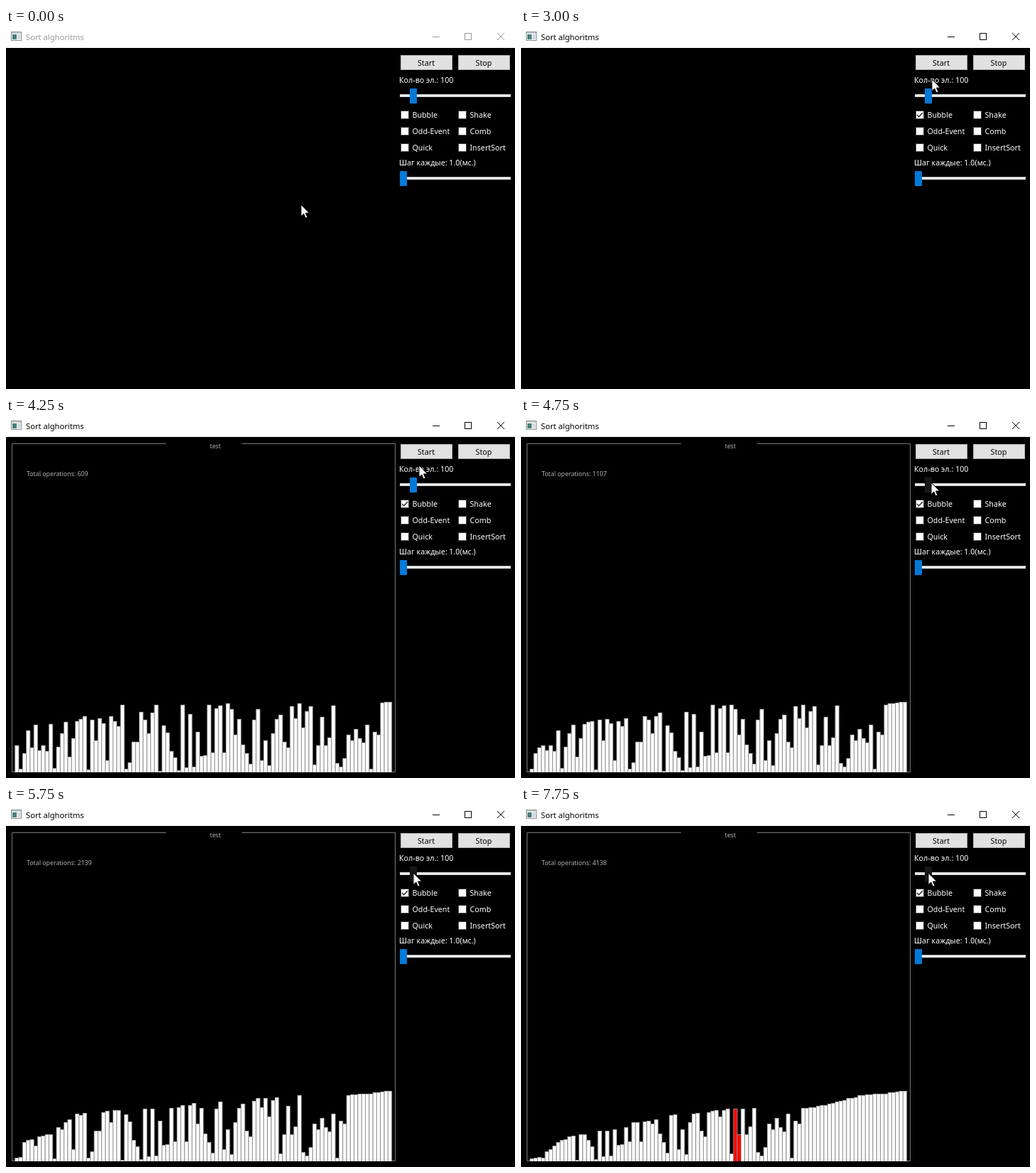
Animation of 716x507 px, one loop 8 s. Source, as an HTML page with a canvas:

```html
<!DOCTYPE html>
<html lang="en">
<head>
<meta charset="utf-8">
<title>Sorting</title>
<style>
  html, body { margin: 0; width: 100%; height: 100%; overflow: hidden; background: #000; }
  canvas { display: block; }
</style>
</head>
<body>
<canvas id="stage" width="716" height="507"></canvas>
<script>
const ctx = document.getElementById('stage').getContext('2d');
const LOOP = 8000, TICK = 250, SORT_START = 3750;

// Bar heights when the chart appears, with the first pass at FIRST_INDEX.
const FIRST_INDEX = 57;
const HEIGHTS = [
  72, 67, 75, 38, 5, 27, 59, 35, 68, 31, 38, 30, 79, 6, 36, 55, 71, 22, 48, 97,
  95, 79, 4, 74, 45, 76, 69, 17, 72, 65, 98, 5, 14, 43, 43, 85, 74, 55, 84, 95,
  2, 66, 56, 30, 21, 3, 95, 7, 82, 8, 57, 23, 24, 95, 28, 90, 94, 99, 28, 97,
  89, 53, 75, 39, 27, 12, 74, 89, 17, 45, 10, 55, 75, 81, 43, 35, 93, 76, 99, 63,
  86, 93, 11, 38, 78, 38, 49, 94, 13, 8, 20, 53, 45, 61, 48, 42, 67, 5, 57, 53
];
// Progress at one-second intervals from SORT_START.
const COMPARISONS = [FIRST_INDEX, 580, 1186, 1787, 2448];
const OPERATIONS = [111, 1107, 2139, 3122, 4138];

// Pointer stops: [time, x, y]
const POINTER = [
  [0, 415, 248], [250, 404, 251], [500, 508, 150], [750, 600, 46], [1750, 586, 127],
  [2000, 574, 138], [2250, 560, 121], [2750, 568, 108], [3000, 578, 72], [3250, 583, 48],
  [4250, 581, 68], [4500, 577, 92], [5000, 573, 94]
];

function rect(x, y, w, h, fill, border) {
  if (fill) { ctx.fillStyle = fill; ctx.fillRect(x, y, w, h); }
  if (border) {
    ctx.strokeStyle = border;
    ctx.lineWidth = 1;
    ctx.strokeRect(x + .5, y + .5, w - 1, h - 1);
  }
}

function line(points, color, width = 1) {
  ctx.beginPath();
  points.forEach(([x, y]) => ctx.lineTo(x, y));
  ctx.strokeStyle = color;
  ctx.lineWidth = width;
  ctx.stroke();
}

function text(str, x, y, color = '#fff', size = 10.7, align = 'left') {
  ctx.font = `${size}px "Noto Sans", "Open Sans", sans-serif`;
  ctx.textAlign = align;
  ctx.fillStyle = color;
  ctx.fillText(str, x, y);
}

function button(label, x, fill = '#e1e1e1', border = '#adadad') {
  rect(x, 38, 73, 21, fill, border);
  text(label, x + 36, 53, '#000', 10.7, 'center');
}

function checkbox(label, x, y, checked) {
  rect(x, y, 12, 12, '#fff', '#444');
  if (checked) line([[x + 2, y + 6], [x + 4.7, y + 8.7], [x + 10, y + 3]], '#222', 1.3);
  text(label, x + 16.5, y + 10);
}

function slider(y, handleX, handleColor = '#007ad9') {
  rect(554, y, 156, 4, '#e7eaea', '#d6d6d6');
  rect(handleX, y - 8, 10, 21, handleColor);
}

function titleBar(active) {
  const ink = active ? '#000' : '#999';
  rect(0, 0, 716, 28, '#fff');
  rect(7, 5, 15, 13, '#f4f4f4', '#8a8f94');
  rect(8, 6, 13, 2, '#c9ced2');
  rect(9, 9, 6, 7, '#47807f');
  rect(16, 9, 4, 7, '#d5d9dc');
  text('Sort alghoritms', 28, 17, ink, 11.2);
  line([[600, 12.5], [610, 12.5]], ink);
  rect(645, 7, 10, 10, null, ink);
  line([[691, 7], [701, 17]], ink);
  line([[701, 7], [691, 17]], ink);
}

function panel(t) {
  if (t >= 3500 && t < 3750) button('Start', 555, '#cce4f7', '#005499');
  else if ((t >= 750 && t < 1750) || (t >= 3250 && t < 4250)) button('Start', 555, '#e5f1fb', '#0078d7');
  else if (t >= 1750 && t < 2000) button('Start', 555, '#e2e7ee', '#78a0c8');
  else button('Start', 555);
  button('Stop', 636);
  text('Кол-во эл.: 100', 553, 77);
  slider(93, 568, t >= 4500 ? '#171717' : undefined);
  [['Bubble', 'Shake'], ['Odd-Event', 'Comb'], ['Quick', 'InsertSort']].forEach(([left, right], row) => {
    const y = 116 + row * 23;
    checkbox(left, 555, y, row === 0 && t >= 2250);
    checkbox(right, 636, y);
  });
  text('Шаг каждые: 1.0(мс.)', 553, 193);
  slider(209, 554);
}

function bubbleSort(comparisons) {
  const bars = [...HEIGHTS];
  let j = FIRST_INDEX, last = bars.length - 1;
  for (let n = FIRST_INDEX; n < comparisons; n++) {
    if (bars[j] > bars[j + 1]) [bars[j], bars[j + 1]] = [bars[j + 1], bars[j]];
    if (++j === last) { j = 0; last--; }
  }
  return { bars, j };
}

function chart(t) {
  const seconds = (t - SORT_START) / 1000;
  const i = Math.min(3, Math.floor(seconds));
  const progress = list => Math.round(list[i] + (list[i + 1] - list[i]) * (seconds - i));
  const operations = progress(OPERATIONS);
  const { bars, j } = bubbleSort(progress(COMPARISONS));
  const swapping = operations % 2 === 0 && bars[j] > bars[j + 1];

  line([[225, 37.5], [8.5, 37.5], [8.5, 498.5], [547.5, 498.5], [547.5, 37.5], [332, 37.5]], '#777');
  text('test', 294.5, 44, '#b0b0b0', 8.8, 'center');
  text('Total operations: ' + operations, 29, 83, '#b0b0b0', 8.8);
  bars.forEach((h, k) => {
    const x = 12.7 + k * 5.3;
    ctx.fillStyle = swapping && (k === j || k === j + 1) ? '#f00' : '#fff';
    ctx.fillRect(x, 499 - h, 5.3, h);
    line([[x, 499], [x, 499.5 - h], [x + 5.3, 499.5 - h], [x + 5.3, 499]], '#8c8c8c', .9);
  });
}

function pointer(t) {
  const [, x, y] = POINTER.findLast(stop => stop[0] <= t);
  ctx.beginPath();
  [[0, 0], [0, 16.5], [3.8, 13], [6.4, 19], [9, 17.9], [6.5, 12], [11.7, 12]]
    .forEach(([dx, dy]) => ctx.lineTo(x + dx, y + dy));
  ctx.closePath();
  ctx.fillStyle = '#fff';
  ctx.fill();
  ctx.strokeStyle = '#000';
  ctx.lineWidth = 1;
  ctx.stroke();
}

function draw(now) {
  const t = Math.floor(now % LOOP / TICK) * TICK;
  rect(0, 0, 716, 507, '#000');
  titleBar(t >= 2250);
  if (t >= SORT_START) chart(t);
  panel(t);
  pointer(t);
  requestAnimationFrame(draw);
}
requestAnimationFrame(draw);
</script>
</body>
</html>
```
